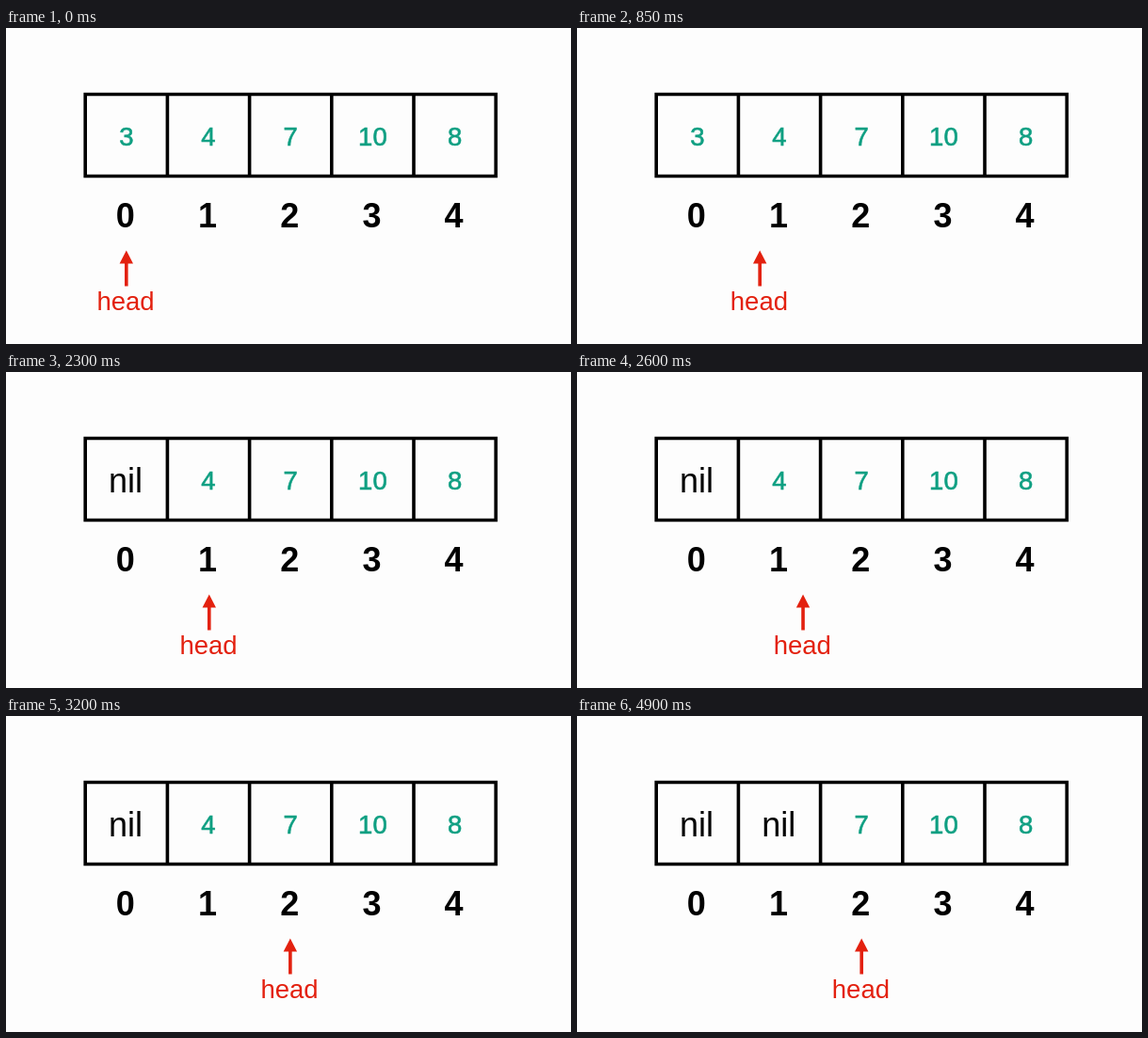
Recreate the animation shown at these times as an HTML page. Size 600x336 px, loop 5 s.

```html
<!DOCTYPE html>
<html lang="en">
<head>
<meta charset="utf-8">
<title>Queue head</title>
<style>
  html, body { margin: 0; width: 100%; height: 100%; overflow: hidden; background: #fdfdfd; }
  svg { display: block; width: 600px; height: 336px; }
  text { font-family: "Liberation Sans", Arial, sans-serif; text-anchor: middle; }
  .grid { fill: none; stroke: #000; stroke-width: 3.6; }
  .value { font-size: 27.5px; fill: #0f9f82; stroke: #0f9f82; stroke-width: .6; }
  .index { font-size: 36px; font-weight: bold; }
  .nil { font-size: 36px; }
  .head { fill: #e3210f; }
  .head text { font-size: 27.5px; }
</style>
</head>
<body>
<svg id="stage" viewBox="0 0 600 336">
  <path class="grid" id="grid"/>
  <g class="head" id="head">
    <path d="M0 236.5L7.2 250.5H1.8V274.5H-1.8V250.5H-7.2Z"/>
    <text x="-.8" y="300">head</text>
  </g>
</svg>
<script>
const LOOP = 5000, TICK = 50;
const LEFT = 84.2, PITCH = 87.2, TOP = 70.5, BOTTOM = 157.5;
const MOVE = 1000, FADE = 660;
const moveStarts = [175, 2240];
const fadeStarts = [1190, 3255];
const values = [3, 4, 7, 10, 8];

const stage = document.getElementById("stage");
const head = document.getElementById("head");
const center = i => LEFT + PITCH * (i + 0.5);
const progress = (t, start, length) => Math.min(1, Math.max(0, (t - start) / length));
const ease = p => (1 - Math.cos(Math.PI * p)) / 2;

function addText(kind, x, y, label) {
  const node = document.createElementNS("http://www.w3.org/2000/svg", "text");
  node.setAttribute("class", kind);
  node.setAttribute("x", x);
  node.setAttribute("y", y);
  node.textContent = label;
  return stage.appendChild(node);
}

let lines = `M${LEFT} ${TOP}H${LEFT + 5 * PITCH}V${BOTTOM}H${LEFT}Z`;
for (let i = 1; i < 5; i++) lines += `M${LEFT + i * PITCH} ${TOP}V${BOTTOM}`;
document.getElementById("grid").setAttribute("d", lines);

const numbers = values.map((v, i) => addText("value", center(i), 124.5, v));
values.forEach((v, i) => addText("index", center(i) - 1, 212, i));
const nils = fadeStarts.map((s, i) => addText("nil", center(i) - 0.8, 127.5, "nil"));

function draw(t) {
  const slot = moveStarts.reduce((sum, s) => sum + ease(progress(t, s, MOVE)), 0);
  head.setAttribute("transform", `translate(${center(slot)} 0)`);
  fadeStarts.forEach((s, i) => {
    const p = progress(t, s, FADE);
    numbers[i].setAttribute("opacity", 1 - p);
    nils[i].setAttribute("opacity", p);
  });
}

const begin = performance.now();
function frame() {
  const t = (performance.now() - begin) % LOOP;
  draw(Math.floor(t / TICK) * TICK);
  requestAnimationFrame(frame);
}
draw(0);
requestAnimationFrame(frame);
</script>
</body>
</html>
```
